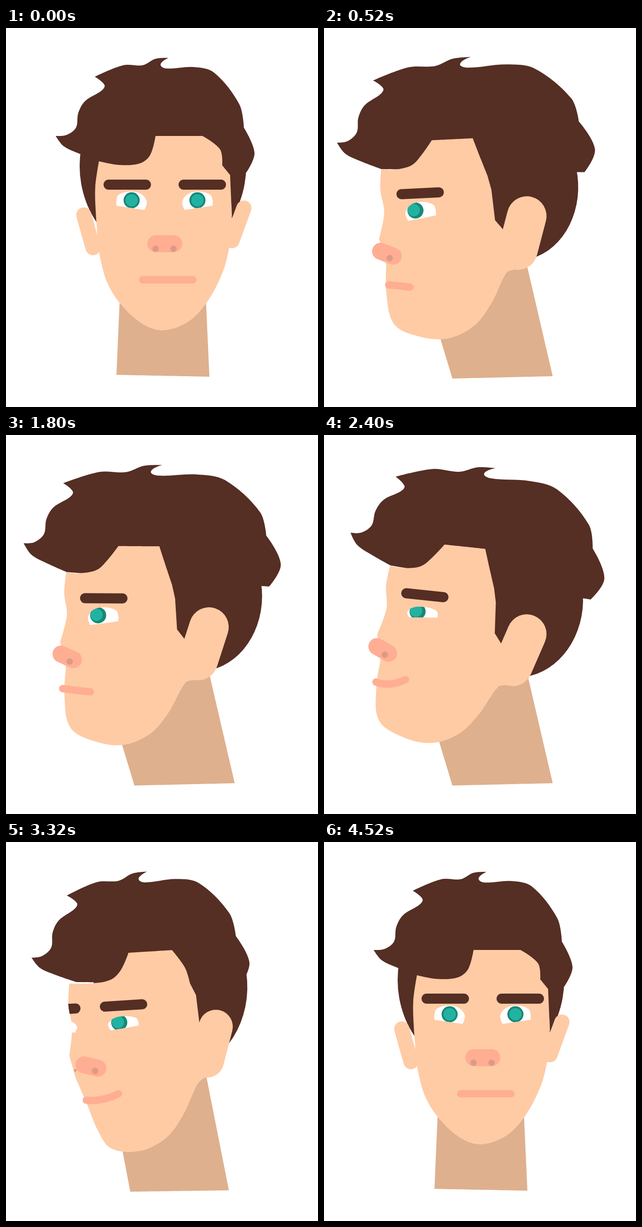
Animation, 678 px wide and 825 px high, one loop 5000 ms. Source, as an HTML page with a canvas:

```html
<!DOCTYPE html>
<html lang="en">
<head>
<meta charset="utf-8">
<title>Turning head</title>
<style>
html, body { margin: 0; width: 100%; height: 100%; overflow: hidden; background: #fff; }
canvas { display: block; }
</style>
</head>
<body>
<canvas id="stage" width="678" height="825"></canvas>
<script>
const ctx = document.getElementById('stage').getContext('2d');
const LOOP = 5000, STEP = 40;
const SKIN = '#fecba5', SHADE = '#deb08e', HAIR = '#552e24', PINK = '#ffae93',
      NOSTRIL = '#df9a86', RIM = '#188877', IRIS = '#22b2a2', WHITE = '#fff';

// "x,y" key points; a star marks a corner
const points = text => text.trim().split(/\s+/).map(p => {
  const [x, y] = p.split(',').map(parseFloat);
  return { x, y, corner: p.endsWith('*') };
});
const lerp = (a, b, k) => a + (b - a) * k;
const blend = ([front, profile], k) => front.map((p, i) => ({
  x: lerp(p.x, profile[i].x, k), y: lerp(p.y, profile[i].y, k), corner: p.corner
}));
const pair = (front, profile) => [points(front), points(profile)];

const crown = points(`108,235* 131,233 152,217 157,185 172,159 208,136 214,124 193,106*
  255,81 297,81 325,67 353,65* 336,79 347,88 408,85 452,97 507,166 517,217* 540,272
  522,315* 202,290* 158,273 125,257`);

// Parts of the face outline, front and profile
const cheek = pair('202,290* 194,345 195,400 200,465* 203,492*', '130,300 126,345 132,393 118,451 131,507');
const jaw = pair('219,552 250,602', '128,567 141,637');
const chin = pair('298,645 343,658 398,638 440,592 473,526 485,478*',
                  '190,666 255,675 315,650 355,603 391,538 408,533');
const hairline = pair('491,408* 490,385* 487,320* 470,299* 465,264 427,235* 325,235* 313,277 290,295 245,298',
                      '390,446 372,423 367,355 360,325 348,290 332,242 243,242 220,272 197,294 160,302');

const neck = pair('248,570* 433,560* 442,759* 240,755*', '244,647 436,495 497,758 279,763');
const eyeWhite = points('33,12* 33,0 28,-12 4,-19 -20,-14 -33,3 -28,21*');
const nose = pair('325.5,469.5 364.5,469.5', '120,478 147,490');
const nostrils = pair('325,480.5 364,480.5', '95,489 139,494');
const mouth = pair('297,548 351,548 406,548', '134,552 157,555 180,559');
const farEar = pair('169,407 189,478', '230,420 240,470');
const nearEar = pair('517,392 491,463', '441,417 418,490');
const eyes = pair('273,375 416,375', '80,394 211,394');
const brows = pair('263.5,341 426.5,341', '72,356 212,356');
const pivot = pair('343,480', '285,421');

// Time and value in turn, eased between keys
const turnKeys = [0, 0, 490, 1, 2820, 1, 3320, .56, 3600, .05, 3840, 0];
const tiltKeys = [0, 0, 240, -3, 560, -2.8, 1080, 0, 1720, 0, 2220, 6, 2820, 6,
                  3260, -3.6, 3600, -3.4, 3840, 0];
const smileKeys = [1720, 0, 2220, 1];
const poutKeys = [1160, 0, 1680, 1, 2240, 1, 2520, 1.15, 2800, .8];
const blinkTimes = [1340, 4340];

function track(keys, t) {
  if (t <= keys[0]) return keys[1];
  for (let i = 2; i < keys.length; i += 2) {
    if (t < keys[i]) {
      const k = (t - keys[i - 2]) / (keys[i] - keys[i - 2]);
      return lerp(keys[i - 1], keys[i + 1], k * k * (3 - 2 * k));
    }
  }
  return keys[keys.length - 1];
}

// Closed curve through the points, sharp at corners
function outline(pts) {
  const n = pts.length, path = new Path2D();
  const handle = (i, len) => {
    const p = pts[i], a = pts[(i + n - 1) % n], b = pts[(i + 1) % n];
    const k = p.corner ? 0 : len / (Math.hypot(b.x - a.x, b.y - a.y) || 1);
    return [p.x + (b.x - a.x) * k, p.y + (b.y - a.y) * k];
  };
  path.moveTo(pts[0].x, pts[0].y);
  pts.forEach((p, i) => {
    const j = (i + 1) % n, q = pts[j], len = Math.hypot(q.x - p.x, q.y - p.y) / 3;
    path.bezierCurveTo(...handle(i, len), ...handle(j, -len), q.x, q.y);
  });
  path.closePath();
  return path;
}

function fill(path, color) {
  ctx.fillStyle = color;
  ctx.fill(path);
}

function ellipse(x, y, rx, ry, color) {
  const path = new Path2D();
  path.ellipse(x, y, rx, ry, 0, 0, 7);
  fill(path, color);
}

function stroke([a, b, c], width, color) {
  ctx.beginPath();
  ctx.moveTo(a.x, a.y);
  if (c) ctx.quadraticCurveTo(b.x, b.y, c.x, c.y);
  else ctx.lineTo(b.x, b.y);
  ctx.lineWidth = width;
  ctx.strokeStyle = color;
  ctx.stroke();
}

// The hair slides aside and its back half widens as the head turns
const turnHair = turn => crown.map(({ x, y, corner }) => ({
  x: x - 71 * turn + .39 * turn * turn * Math.max(0, x - 214),
  y: y + .13 * turn * Math.max(0, y - 217),
  corner
}));

function eye({ x, y }, flip, gaze, lid) {
  if (lid < .02) return;
  const path = outline(eyeWhite.map(p => ({ x: x + flip * p.x, y: y + lid * p.y, corner: p.corner })));
  ctx.save();
  fill(path, WHITE);
  ctx.clip(path);
  ellipse(x - 11 * gaze, y - gaze, 17.5, 17.5, RIM);
  ellipse(x - 14.5 * gaze, y - 2 * gaze, 13.3, 13.3, IRIS);
  ctx.restore();
}

const brow = ({ x, y }) => stroke([{ x: x - 40.5, y }, { x: x + 40.5, y }], 22, HAIR);

function draw(t) {
  // Features on the front of the head follow the sine of its turn
  const turn = track(turnKeys, t), side = Math.sin(turn * Math.PI / 2);
  const smile = side * track(smileKeys, t), pout = side * track(poutKeys, t);
  const blink = Math.min(...blinkTimes.map(b => Math.abs(t - b) / 180), 1);
  const lid = blink * (1 - .35 * smile);

  ctx.fillStyle = WHITE;
  ctx.fillRect(0, 0, 678, 825);
  ctx.lineCap = 'round';
  fill(outline(blend(neck, side)), SHADE);

  const [hub] = blend(pivot, turn);
  ctx.save();
  ctx.translate(hub.x, hub.y);
  ctx.rotate(track(tiltKeys, t) * Math.PI / 180);
  ctx.translate(-hub.x, -hub.y);

  const back = turn * turn;
  ellipse(lerp(341, 420, back), lerp(300, 350, back), lerp(181, 136, back), lerp(203, 163, back), HAIR);
  fill(outline(turnHair(turn)), HAIR);

  const face = outline([
    ...blend(cheek, side), ...blend(jaw, turn), ...blend(chin, side), ...blend(hairline, turn)
  ]);
  fill(face, SKIN);
  stroke(blend(farEar, side), 33, SKIN);
  stroke(blend(nearEar, side), lerp(33, 86, side), SKIN);

  const [farEye, nearEye] = blend(eyes, side), [farBrow, nearBrow] = blend(brows, side);
  ctx.save();
  ctx.clip(face);
  eye(farEye, -1, side, lid);
  brow(farBrow);
  ctx.restore();
  eye(nearEye, 1, side, lid);
  brow(nearBrow);

  stroke(blend(nose, side), 37, PINK);
  const [far, near] = blend(nostrils, side), shrink = 7 * (1 - side * side);
  ellipse(far.x, far.y, shrink, shrink, NOSTRIL);
  ellipse(near.x, near.y, 7, 7, NOSTRIL);

  const [a, b, c] = blend(mouth, side);
  stroke([
    { x: a.x - 10 * pout + 3 * smile, y: a.y + pout + 2 * smile },
    { x: b.x, y: b.y + 2 * pout + 6 * smile },
    { x: c.x + 4 * pout + 5 * smile, y: c.y + 2 * pout - 18 * smile }
  ], 16, PINK);
  ctx.restore();
}

const start = performance.now();
function frame() {
  const t = (performance.now() - start) % LOOP;
  draw(Math.floor(t / STEP) * STEP);
  requestAnimationFrame(frame);
}
frame();
</script>
</body>
</html>
```
